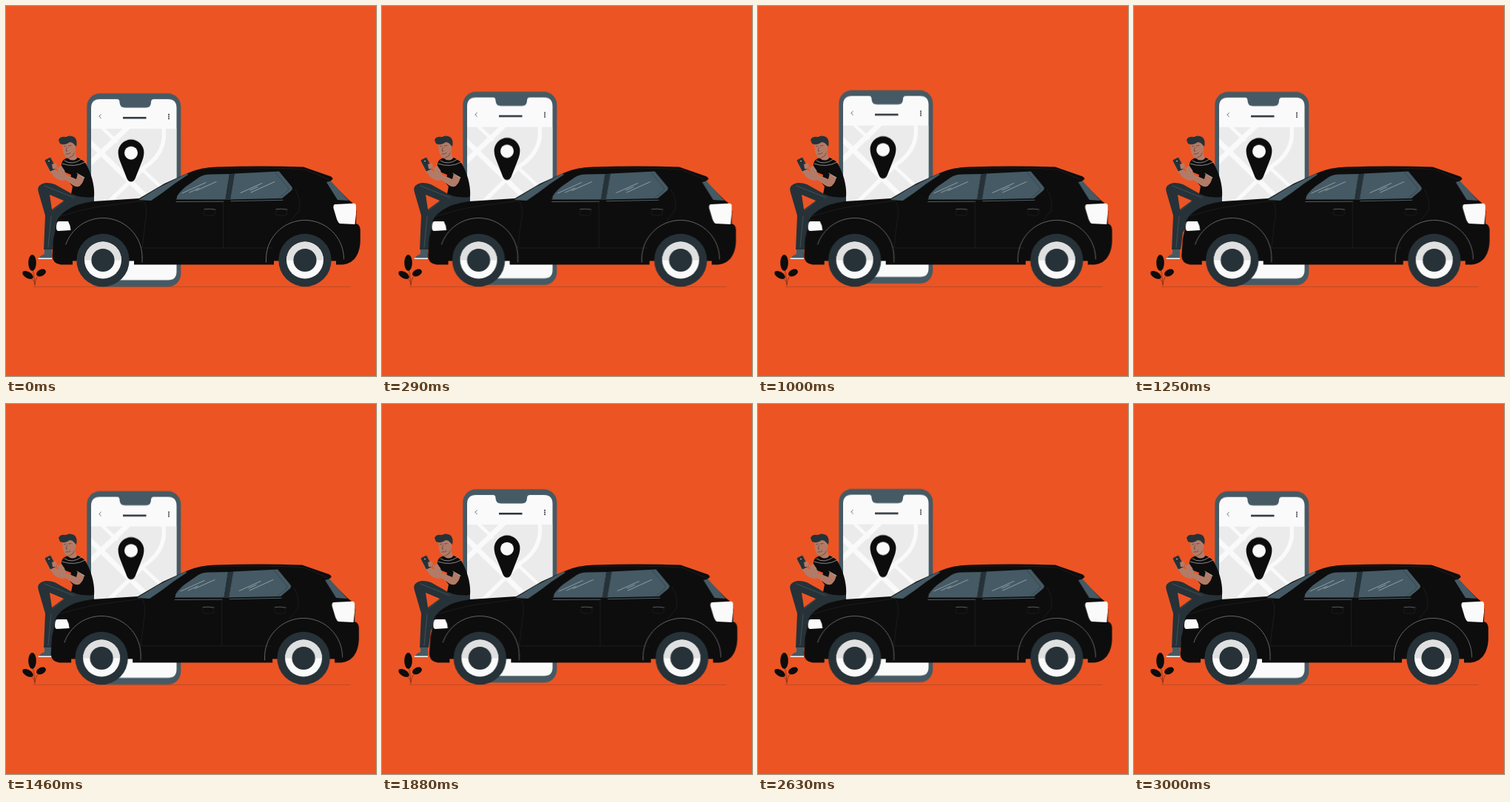
Animation, 500 px wide and 500 px high, one loop 3040 ms. Source, as an HTML page:

```html
<!DOCTYPE html>
<html lang="en">
<head>
<meta charset="utf-8">
<title>Ride on the way</title>
<style>
html, body { margin: 0; width: 100%; height: 100%; overflow: hidden; background: #ec5424; }
svg { display: block; width: 100%; height: 100%; }
.slate { fill: #455a64; }
.dark { fill: #263238; }
.light { fill: #fafafa; }
.black { fill: #0d0d0d; }
.skin { fill: #b27b68; }
.line { fill: none; stroke-linecap: round; stroke-linejoin: round; }
#phone { animation: float 1.52s linear infinite; }
#car { animation: shake 3.04s cubic-bezier(.36, .07, .19, .97) infinite; }
@keyframes float {
  50% { transform: translateY(-6.5px); }
}
@keyframes shake {
  0%, 100% { transform: translateX(0); }
  10%, 90% { transform: translateX(-.5px); }
  20%, 80% { transform: translateX(1px); }
  30%, 50%, 70% { transform: translateX(-2px); }
  40%, 60% { transform: translateX(2px); }
}
</style>
</head>
<body>
<svg viewBox="0 0 500 500">
  <defs>
    <clipPath id="map"><rect x="115" y="166" width="115.500" height="130"/></clipPath>
    <g id="wheel">
      <circle r="35.700" class="dark"/>
      <circle r="25" class="light"/>
      <path d="M-25 0A25 25 0 0 1 25 0Z" fill="#e0e0e0"/>
      <circle r="15.600" class="dark"/>
    </g>
    <g id="handle" class="line">
      <rect x="-8" y="-3.500" width="16" height="8" rx="4" stroke="#222" stroke-width=".7"/>
      <path d="M-7-4Q0-5 8-3.500" stroke="#858585" stroke-width=".6"/>
    </g>
  </defs>

  <path d="M37 379.500H465" class="line" stroke="#a5401f" stroke-width=".6"/>

  <g id="phone">
    <rect x="109.300" y="118.300" width="127" height="261.300" rx="17.500" class="slate"/>
    <path class="light" d="M127 126H150Q153.500 126 153.500 130Q153.500 137.500 161 137.500H189Q196 137.500 196 130Q196 126 200 126H219Q230.500 126 230.500 138V359Q230.500 370.500 219 370.500H127Q115 370.500 115 359V138Q115 126 127 126Z"/>
    <g clip-path="url(#map)">
      <path fill="#ebebeb" d="M115 166H230.500V296H115Z"/>
      <g class="line" stroke="#fafafa">
        <path d="M108 179L205 273" stroke-width="7"/>
        <path d="M168 161L108 218" stroke-width="7"/>
        <path d="M212 160C218 188 206 206 186 219L136 268" stroke-width="5.500"/>
        <path d="M126 161L149 183M184 221L215 250" stroke-width="4.500"/>
      </g>
    </g>
    <path d="M128.500 146.700L125.700 149.200L128.500 151.700" class="line" stroke="#455a64" stroke-width=".8"/>
    <rect x="158" y="150" width="31.500" height="2.500" class="dark"/>
    <g class="dark">
      <circle cx="220" cy="146.700" r="1"/><circle cx="220" cy="149.500" r="1"/><circle cx="220" cy="152.300" r="1"/>
    </g>
    <path class="black" d="M169 237.500C165.500 237.500 164 235 162.500 231L155 212Q151.600 204 151.600 198A17.400 17.400 0 0 1 186.400 198Q186.400 204 183 212L175.500 231C174 235 172.500 237.500 169 237.500Z"/>
    <circle cx="169" cy="198.700" r="9" class="light"/>
  </g>

  <g id="plant">
    <path d="M39 378C39 366 36 360 36 350M39 376Q37 368 30 365M39 376Q40 366 47 361" class="line" stroke="#7c2c16" stroke-width=".7"/>
    <g class="black">
      <ellipse cx="35.500" cy="347" rx="5.300" ry="11"/>
      <ellipse cx="29.500" cy="363.500" rx="8" ry="4.300" transform="rotate(30 29.500 363.500)"/>
      <ellipse cx="47.500" cy="360.500" rx="6.800" ry="4.500" transform="rotate(-25 47.500 360.500)"/>
    </g>
  </g>

  <g id="man">
    <path class="slate" d="M52 328H62V341H45Q45 338 52 335Z"/>
    <path class="light" d="M44 340.500H62V342H43.500Z"/>
    <path class="dark" fill-rule="evenodd" d="M119 256L93 256L66 241Q52 236 45 243Q42 246 44 252L53 283L51 329H63L66 306L80 285L119 268ZM59 255L78 263L62 275Z"/>
    <path d="M52 243L92 259M61 284L57 326M78 264L63 276" class="line" stroke="#5d6d75" stroke-width=".5"/>
    <path class="skin" d="M53 208L60 211L67 222L79 228L82 235Q75 238 66 232L58 222Z"/>
    <path class="black" d="M75 213Q76 207 84 205H97Q106 208 110 217C117 231 120 246 119 258Q103 260 88 254L90 244L86 239L88 228L78 224Q74 218 75 213Z"/>
    <path class="skin" d="M97 226L106 231Q105 238 100 243Q96 246 90 242L78 233Q71 230 70 221L73 216L79 222L81 228L95 234Z"/>
    <path class="black" d="M94 213Q101 210 107 219Q110 226 107 232L95 226Z"/>
    <rect x="55.500" y="205.500" width="9" height="17" rx="1.500" class="dark" transform="rotate(-27 60 214)"/>
    <circle cx="58" cy="209.500" r=".7" class="light"/>
    <path class="skin" d="M62 214L67 212L69 216L67 220L63 220ZM68 219L75 216L79 222L72 224Z"/>
    <path class="skin" d="M76 185L92 183Q96 190 93 197L96 206Q90 211 84 206Q78 203 77 196Z"/>
    <path d="M85 205Q90 204 92 199" class="line" stroke="#895946" stroke-width="1.200"/>
    <path class="dark" d="M71 181Q73 175.500 81 177Q86 174 92 177Q97 181 95 190L92 187Q90 184 86 184Q80 189 73 186Z"/>
    <path d="M78.500 190L81 189M84.500 189L88 188.500M81 200Q84 201 87 198.500M82.500 191L81 196H83" class="line" stroke="#543a34" stroke-width=".7"/>
    <path d="M79 209Q89 216 102 207M76 213Q92 219 107 211M96 226L106 232" class="line" stroke="#d8d8d8" stroke-width=".6"/>
  </g>

  <g id="car">
    <path class="black" d="M62.500 338L64 315L67 301L69 290Q72 283 82 276Q95 267 118 264L180 260L214 240L245 226Q262 218 285 217.500Q345 215.500 402 217.500L438 230Q441.500 231.500 441.500 234L438 237L463 262Q473 268 473.500 278L473 294Q478 295 478.800 302L478.800 318C478 336 470 348 455 349.500H446V344.500H362V349.500H173V344.500H90V349.500H74Q63 348 62.500 338Z"/>

    <path class="slate" d="M179 262L207 245L245 226L246 228L228 240L212 252L196 263Z"/>
    <path class="slate" d="M229 261.500Q232 253 243 244L261 231.500Q267 227.500 276 227.500L302 227L296.500 261.500Z"/>
    <path class="dark" d="M302 227L309 226.500L303 262L296.500 262Z"/>
    <path class="slate" d="M309 226.500L369 223.500L386 244Q388.500 247 385 250L373 260L303 261.500Z"/>
    <path d="M364 225L381 245Q383 247 380 250L369 259.500" class="line" stroke="#33434b" stroke-width=".8"/>
    <path d="M230 264.500L294 264.200M304 263.700L374 262.300" class="line" stroke="#71818a" stroke-width=".7"/>
    <path d="M238 253L270 238.500M248 252L261 246M257 249.500L284 237.500M317 252.500L346 239.500M331 252L363 237.500M330 249L340 244.500" class="line" stroke="#cfd8dc" stroke-width=".55"/>
    <path class="slate" d="M433 238L439 236.500L463 263L448 262Z"/>
    <path class="black" d="M205 265Q207 253 220 251Q230 250 231 258Q231 264 222 265L207 268Z"/>

    <path class="light" d="M71 291H84Q87 296 87.500 303L71 304Q67.500 304 68 298Q68.500 291 71 291Z"/>
    <path class="light" d="M445 268L470 266.800Q473 267 473 270V281L471.500 295L451 294Q449 293 447 288L442.500 273Q442 268 445 268Z"/>

    <g class="line" stroke="#242424" stroke-width=".7">
      <path d="M74 284Q95 277 120 272L185 263M185 262Q193 272 188 293L184 327H360M293.500 265V327M391 248Q400 264 396 277L385 290M265 220Q340 217 405 221L437 235"/>
    </g>
    <g class="line" stroke="#999" stroke-width=".7" stroke-dasharray="2.500 1">
      <path d="M81 322A53 53 0 0 1 184 340V346M351.500 346V342A52.500 52.500 0 0 1 456.500 342"/>
    </g>
    <use href="#handle" x="275" y="278.500"/>
    <use href="#handle" x="372" y="278.500"/>
    <use href="#wheel" x="131" y="343.500"/>
    <use href="#wheel" x="404" y="343.500"/>
  </g>
</svg>
</body>
</html>
```
